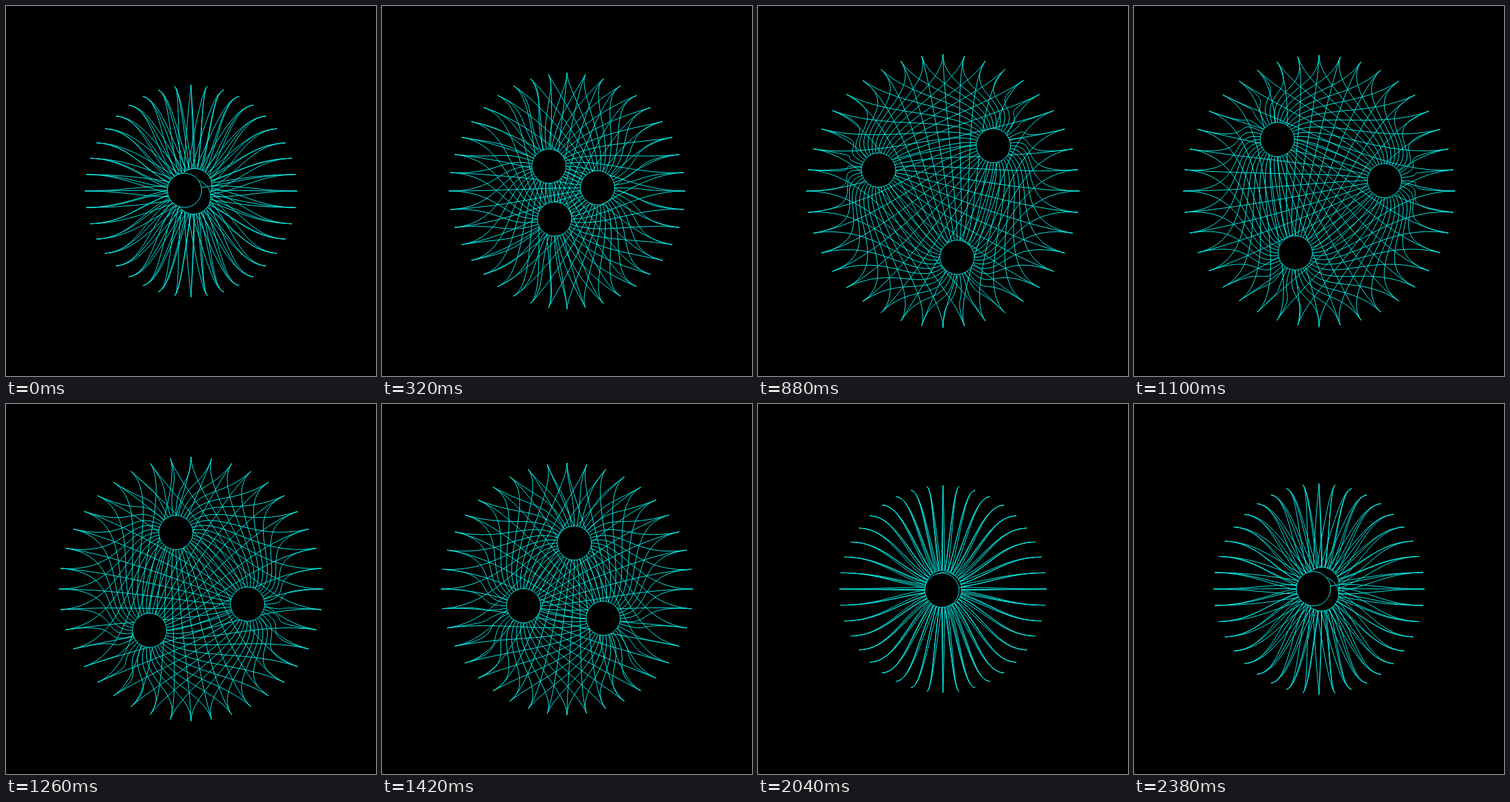
An HTML page for the animation above (2.4 s loop, 540 by 540 pixels).

```html
<!DOCTYPE html>
<html lang="en">
<head>
<meta charset="utf-8">
<title>Three orbiting hubs</title>
<style>
  html, body { margin: 0; width: 100%; height: 100%; overflow: hidden; background: #000; }
  svg { display: block; width: 100vw; height: 100vh; background: #000; }
  path, circle { stroke: #08e6e0; stroke-width: 1; }
  path { fill: none; }
  circle { fill: #000; }
</style>
</head>
<body>
<svg id="stage" viewBox="0 0 540 540"></svg>
<script>
const NS = "http://www.w3.org/2000/svg";
const LOOP = 2400, STEP = 20;
const MID = 270, HUB = 25, RAYS = 40, HUBS = 3;
const RAD = Math.PI / 180;
const stage = document.getElementById("stage");

function add(tag) {
  const el = document.createElementNS(NS, tag);
  stage.appendChild(el);
  return el;
}

// The last ray of each hub lies above the hubs painted before it.
const web = add("path");
const hubs = Array.from({ length: HUBS }, () => ({ ray: add("path"), disc: add("circle") }));
hubs.forEach(h => h.disc.setAttribute("r", HUB));

// Point at an angle on an ellipse around x, y.
function around(x, y, angle, rx, ry = rx) {
  return (x + rx * Math.cos(angle)).toFixed(2) + " " + (y + ry * Math.sin(angle)).toFixed(2);
}

// A curve leaving the hub straight out and bending flat towards the rim.
function ray(x, y, i, rim) {
  const a = i * 2 * Math.PI / RAYS;
  return "M" + around(x, y, a, HUB) +
    "C" + around(x, y, a, HUB * 3) + " " +
    around(MID, MID, a, 100, 150) + " " +
    around(MID, MID, a, rim);
}

function draw(ms) {
  const n = Math.floor((ms % LOOP) / STEP);
  const phase = (36 + 3 * n) * RAD;
  const orbit = 50 - 50 * Math.cos(phase);
  const rim = 150 + orbit / 2;
  let d = "";
  hubs.forEach((h, k) => {
    const a = phase + (120 * k - 90) * RAD;
    const x = MID + orbit * Math.cos(a);
    const y = MID + orbit * Math.sin(a);
    for (let i = 0; i < RAYS - 1; i++) d += ray(x, y, i, rim);
    h.ray.setAttribute("d", ray(x, y, RAYS - 1, rim));
    h.disc.setAttribute("cx", x.toFixed(2));
    h.disc.setAttribute("cy", y.toFixed(2));
  });
  web.setAttribute("d", d);
}

const start = performance.now();
function tick() {
  draw(performance.now() - start);
  requestAnimationFrame(tick);
}
draw(0);
requestAnimationFrame(tick);
</script>
</body>
</html>
```
